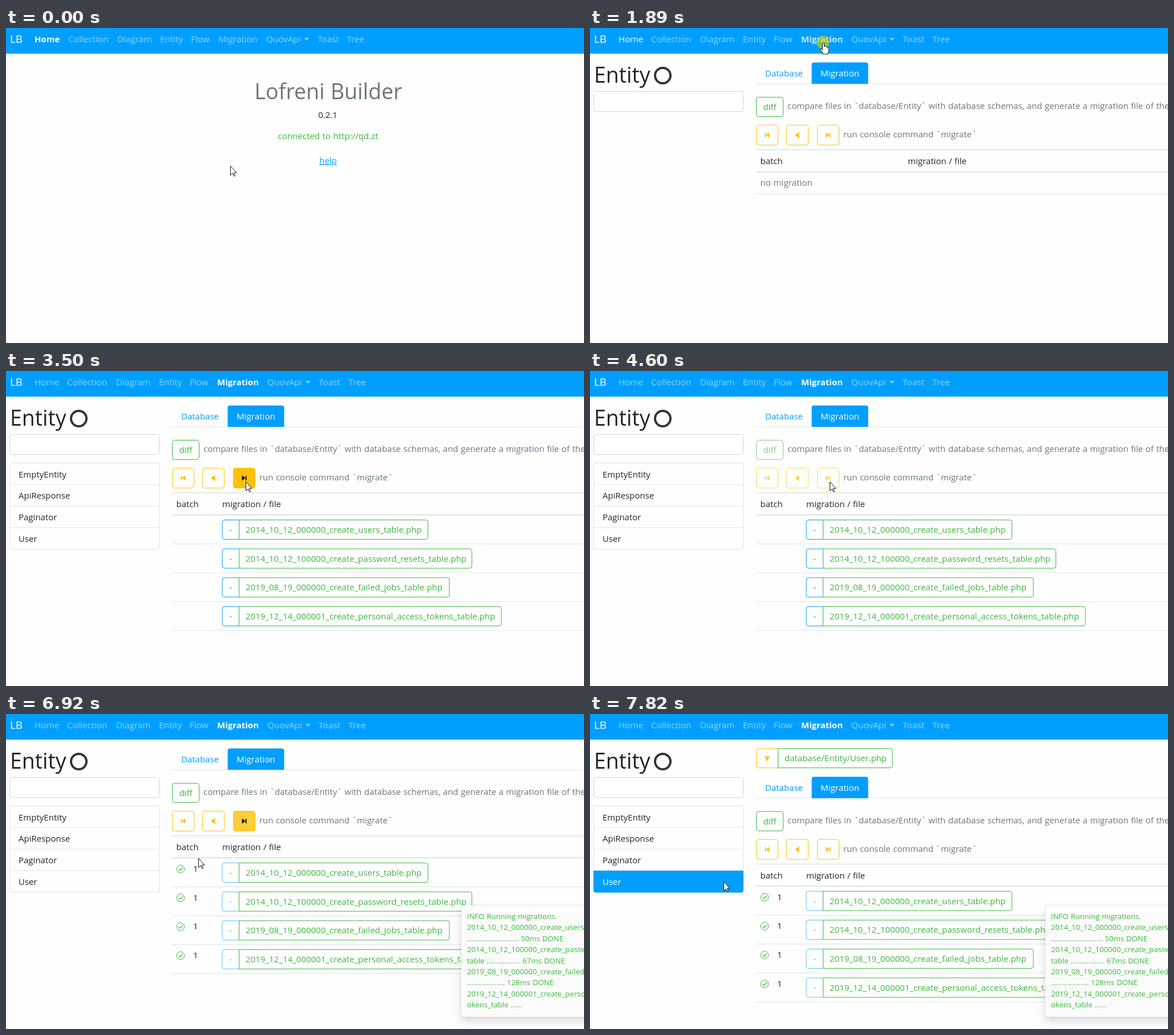
An HTML page for the animation above (8 s loop, 1013x553 px).

```html
<!DOCTYPE html>
<html lang="en">
<head>
<meta charset="utf-8">
<title>Migration demo</title>
<style>
html, body { margin: 0; width: 100%; height: 100%; overflow: hidden; background: #fefefe; }
svg { display: block; font-family: "Open Sans", "Noto Sans", sans-serif; }
text { white-space: pre; word-spacing: .5px; }
.toast { filter: drop-shadow(0 8px 8px rgba(0, 0, 0, .15)); }
</style>
</head>
<body>
<svg id="stage" width="1013" height="553" viewBox="0 0 1013 553"></svg>
<script>
const BLUE = '#009fff', GREEN = '#3cb83c', AMBER = '#ffc107';
const INK = '#212529', GRAY = '#6c757d', LINE = '#dee2e6';
const LOOP = 8000, SHIFT = 49.7, ROW = 50.7;

const NAV = ['Home', 'Collection', 'Diagram', 'Entity', 'Flow', 'Migration', 'QuovApi', 'Toast', 'Tree'];
const NAV_HOME = [50, 109, 195, 270, 324, 372, 456, 546, 597];
const NAV_MIGRATION = [50, 107, 193, 268, 322, 370, 458, 548, 600];
const ENTITIES = ['EmptyEntity', 'ApiResponse', 'Paginator', 'User'];
const FILES = [
  ['2014_10_12_000000_create_users_table.php', 739.5],
  ['2014_10_12_100000_create_password_resets_table.php', 816.5],
  ['2019_08_19_000000_create_failed_jobs_table.php', 777],
  ['2019_12_14_000001_create_personal_access_tokens_table.php', 868]
];
const LOG = [
  'INFO Running migrations.',
  '2014_10_12_000000_create_users_table',
  '.'.repeat(26) + ' 50ms DONE',
  '2014_10_12_100000_create_password_resets_',
  'table ' + '.'.repeat(17) + ' 67ms DONE',
  '2019_08_19_000000_create_failed_jobs_table',
  '.'.repeat(19) + ' 128ms DONE',
  '2019_12_14_000001_create_personal_access_t',
  'okens_table ......'
];

const text = (x, y, s, fill = INK, size = 15, more = '') =>
  `<text x="${x}" y="${y}" fill="${fill}" font-size="${size}" ${more}>${s}</text>`;
const centered = (x, y, s, fill, size, more = '') =>
  text(x, y, s, fill, size, 'text-anchor="middle" ' + more);
const box = (x, y, w, h, stroke, fill = 'none', more = '') =>
  `<rect x="${x}" y="${y}" width="${w}" height="${h}" rx="4" stroke="${stroke}" fill="${fill}" ${more}/>`;
const path = (d, fill, stroke = 'none', more = '') =>
  `<path d="${d}" fill="${fill}" stroke="${stroke}" ${more}/>`;
const rule = (y, w = 1, x = 291, end = 1013) =>
  path(`M${x} ${y}H${end}`, 'none', LINE, `stroke-width="${w}"`);
const group = (body, opacity = 1, dy = 0) =>
  `<g opacity="${opacity}" transform="translate(0 ${dy})">${body}</g>`;

// Two joined buttons: a short left one and a green one with a file name.
function pair(x, mid, end, y, color, sign, name, faded) {
  const left = path(`M${mid} ${y}H${x + 4}q-4 0-4 4v26q0 4 4 4H${mid}`, 'none', color) +
    centered((x + mid) / 2, y + 22.5, sign, color);
  return group(left, faded ? .65 : 1) +
    path(`M${mid} ${y}H${end - 4}q4 0 4 4v26q0 4-4 4H${mid}Z`, 'none', GREEN) +
    text(mid + 11.5, y + 22.5, name, GREEN);
}

function navbar(s) {
  const xs = s.home ? NAV_HOME : NAV_MIGRATION;
  const dim = 'rgba(255,255,255,.55)', hover = 'rgba(255,255,255,.78)';
  const active = s.home ? 0 : 5;
  const items = NAV.map((name, i) => {
    let fill = i === active ? '#fff' : dim;
    if (i === 0 && !s.loaded) fill = '#fff';
    if (i === 5 && s.navHover) fill = hover;
    return i === active
      ? text(xs[i], 25, name, fill, 15, 'font-weight="700"')
      : text(xs[i], 25, name, fill, 15.3);
  });
  return `<rect width="1013" height="45" fill="${BLUE}"/>` + text(7, 26, 'LB', '#fff', 19) +
    items.join('') + path(`M${xs[6] + 66.5} 17.5h9l-4.5 4.5z`, dim);
}

const welcome = () =>
  centered(565, 125, 'Lofreni Builder', GRAY, 37.5) +
  centered(564, 158, '0.2.1') +
  centered(564.5, 195, 'connected to http://qd.zt', GREEN, 15.1) +
  centered(564.5, 238, 'help', BLUE, 15, 'text-decoration="underline"');

function sidebar(s) {
  let out = text(7, 96, 'Entity', INK, 37.5) +
    '<circle cx="127.5" cy="83.5" r="13.5" fill="none" stroke="#333" stroke-width="4"/>' +
    box(6.5, 111.5, 262, 35, '#ced4da', '#fff');
  if (!s.loaded) return out;
  if (s.rowHover) out += path('M7 275.5H268V313H7z', '#f8f9fa');
  out += box(6.5, 161.5, 262, 151.5, '#dfdfdf');
  for (let i = 1; i < 4; i++) out += rule(161.5 + i * 37.8, 1, 7, 268);
  if (s.picked) out += path('M6 275H269V309.500q0 4-4 4H10q-4 0-4-4z', BLUE);
  ENTITIES.forEach((name, i) => {
    const fill = i === 3 && s.picked ? '#fff' : i === 3 && s.rowHover ? '#495057' : INK;
    out += text(22, 186.5 + i * 37.8, name, fill);
  });
  return out;
}

function toolbar(s) {
  const nextIcon = s.fill ? '#111' : AMBER;
  const buttons = box(291.5, 121.5, 47, 34, GREEN) + centered(315, 144, 'diff', GREEN) +
    [291.5, 344.5, 398.5].map(x => box(x, 170.5, 38, 35, AMBER)).join('') +
    box(398.5, 170.5, 38, 35, AMBER, AMBER, `opacity="${s.fill}"`) +
    path('M306.500 184h1.700v8h-1.700zM314.500 183.500v9l-6.300-4.500z', AMBER) +
    path('M366.500 182.500v11l-7.500-5.500z', AMBER) +
    path('M413.500 183.500v9l6.300-4.500zM419.800 184h1.700v8h-1.700z', nextIcon);
  return group(buttons, s.disabled ? .65 : 1) +
    text(346, 142, 'compare files in `database/Entity` with database schemas, and generate a migration file of their differences', GRAY) +
    text(444, 192, 'run console command `migrate`', GRAY);
}

function table(s) {
  let out = rule(213.7, 1.5) + text(298.500, 239, 'batch') +
    text(s.loaded ? 379 : 557, 239, 'migration / file') + rule(252.5, 2);
  if (!s.loaded) return out + text(298.5, 277, 'no migration', GRAY, 15.2) + rule(291);
  FILES.forEach(([name, end], i) => {
    const y = i * ROW;
    out += pair(379, 408.5, end, 261.5 + y, BLUE, '-', name, s.done) + rule(303.5 + y);
    if (s.done) {
      out += `<circle cx="306" cy="${272 + y}" r="6.8" fill="none" stroke="${GREEN}"/>` +
        path(`M302.800 ${272 + y}l2.500 2.700 4.500-5.200`, 'none', GREEN, 'stroke-width="1.300"') +
        text(328, 277 + y, '1');
    }
  });
  return out;
}

function content(s) {
  const tabs = text(307, 85, 'Database', BLUE) + rule(98) +
    path('M388.500 98V64.500q0-4 4-4h91q4 0 4 4V98z', BLUE) + text(404, 85, 'Migration', '#fff', 15.2);
  const file = s.picked ? pair(291.5, 329.5, 530, 60.5, AMBER, '▼', 'database/Entity/User.php') : '';
  return file + group(tabs + toolbar(s) + table(s), 1, s.picked ? SHIFT : 0);
}

const toast = opacity => group(
  box(797.5, 335.5, 350, 196.500, 'rgba(0,0,0,.1)', 'rgba(255,255,255,.87)', 'class="toast"') +
  LOG.map((line, i) => text(808, 360 + i * 19.4, line, GREEN, 13.1)).join(''), opacity);

// The pointer advances once every 100 ms, as in a screen recording.
function glide(t, start, from, to) {
  const k = Math.min(1, (Math.floor((t - start) / 100) + 1) / 6);
  const e = k * k * (3 - 2 * k);
  return from.map((v, i) => v + (to[i] - v) * e);
}
function pointer(t) {
  const rest = [393, 242], link = [409, 25], button = [420, 194];
  const trail = [[337, 253], [296, 274], [263, 286], [242, 292], [234, 294]];
  if (t < 1090) return rest;
  if (t < 3000) return glide(t, 1090, rest, link);
  if (t < 6920) return glide(t, 3000, link, button);
  return trail[Math.min(4, Math.floor((t - 6920) / 100))];
}

function cursor(t) {
  const [x, y] = pointer(t);
  const within = (a, b) => t >= a && t < b;
  const hand = within(1590, 3000) || within(4300, 4400) || within(5000, 6920);
  const click = within(1790, 2100) ? t - 1790 : within(4300, 4600) ? t - 4300 : -1;
  const ring = click < 0 ? '' :
    `<circle cx="${x - 1}" cy="${y}" r="11.5" fill="#dcd200" opacity="${click < 200 ? .6 : .3}"/>`;
  const shape = hand
    ? 'M-1.500 2Q0-1 1.500 2V7.500Q3 6 4.500 8 6 7 7 9 9 8.500 9.500 11V15Q9 17 8 18.500V21H-1V19L-5 13.500Q-6 10.500-3.500 11.500L-1.500 13.500Z'
    : 'M.500.500V16.500L4.200 13 6.600 18.200 8.600 17.300 6.300 12.200H11Z';
  return ring + `<g transform="translate(${x} ${y})">${path(shape, '#fff', '#111')}</g>`;
}

function stateAt(t) {
  let fill = 0;
  if (t >= 3400) fill = t < 3500 ? .6 : 1;
  if (t >= 4400) fill = 0;
  if (t >= 5000) fill = t < 5100 ? .5 : 1;
  if (t >= 6920) fill = t < 7020 ? .8 : 0;
  return {
    fill,
    home: t < 1890,
    loaded: t >= 2000,
    navHover: t >= 1590 && t < 2000,
    disabled: t >= 4400 && t < 5000,
    done: t >= 5000,
    rowHover: t >= 7120 && t < 7720,
    picked: t >= 7720,
    toast: t < 5000 ? 0 : t < 5100 ? .5 : 1
  };
}

const stage = document.getElementById('stage');
let shown = '';
function frame() {
  const t = performance.now() % LOOP, s = stateAt(t);
  const markup = navbar(s) + (s.home ? welcome() : sidebar(s) + content(s)) +
    (s.toast ? toast(s.toast) : '') + cursor(t);
  if (markup !== shown) stage.innerHTML = shown = markup;
  requestAnimationFrame(frame);
}
frame();
</script>
</body>
</html>
```
